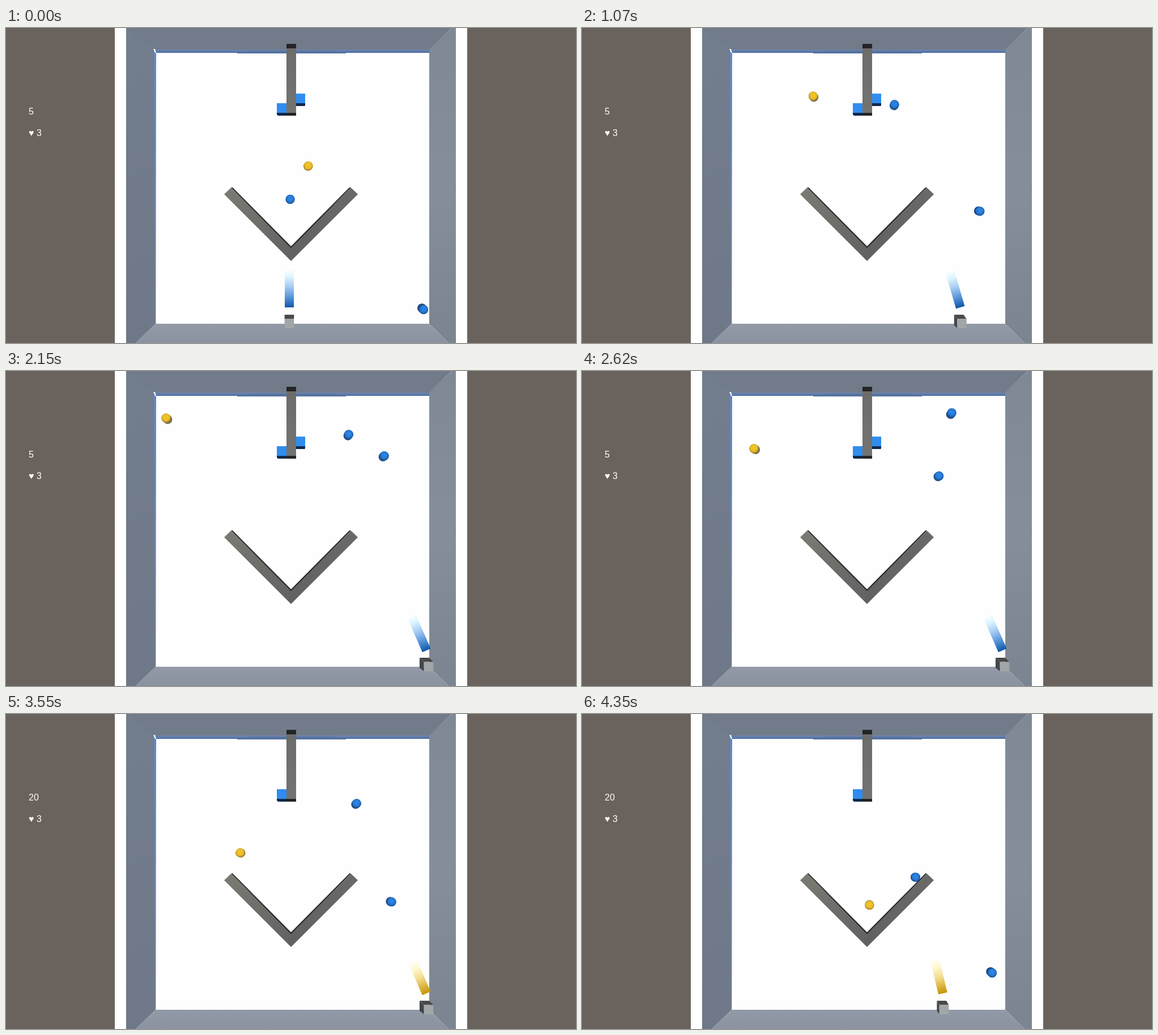
An HTML page that plays this animation: 1006x557 px, repeating every 4.41 s.

```html
<!DOCTYPE html>
<html lang="en">
<head>
<meta charset="utf-8">
<title>Bouncing balls</title>
<style>
  html, body { margin: 0; width: 100%; height: 100%; overflow: hidden; background: #6a625c; }
  svg { display: block; width: 100%; height: 100%; }
  text { font: 16px "Liberation Sans", Arial, sans-serif; fill: #fff; }
</style>
</head>
<body>
<svg viewBox="0 0 1006 557">
  <defs>
    <linearGradient id="wallLeft" x2="0" y2="1"><stop stop-color="#727d8d"/><stop offset="1" stop-color="#6f7888"/></linearGradient>
    <linearGradient id="wallRight" x2="0" y2="1"><stop stop-color="#7f8995"/><stop offset=".5" stop-color="#858f9b"/><stop offset="1" stop-color="#7b8491"/></linearGradient>
    <linearGradient id="wallBottom" x2="0" y2="1"><stop stop-color="#929aa7"/><stop offset="1" stop-color="#8a929f"/></linearGradient>
    <linearGradient id="ledge" x2="0" y2="1"><stop stop-color="#7288ab"/><stop offset="1" stop-color="#4a6da6"/></linearGradient>
    <linearGradient id="post" x2="0" y2="1"><stop stop-color="#6c6c6a"/><stop offset="1" stop-color="#737371"/></linearGradient>
    <linearGradient id="armLeft" x2="1" y2="1"><stop stop-color="#7a7c74"/><stop offset="1" stop-color="#616161"/></linearGradient>
    <linearGradient id="armRight" x1="1" x2="0" y2="1"><stop stop-color="#6a6a69"/><stop offset="1" stop-color="#616161"/></linearGradient>
    <linearGradient id="beamBlue" x2="0" y2="1">
      <stop stop-color="#fff"/><stop offset=".2" stop-color="#ddf6fe"/><stop offset=".45" stop-color="#a9cdf3"/>
      <stop offset=".75" stop-color="#5391d6"/><stop offset="1" stop-color="#0e57a8"/>
    </linearGradient>
    <linearGradient id="beamGold" x2="0" y2="1">
      <stop offset=".07" stop-color="#fff"/><stop offset=".3" stop-color="#fff8d0"/><stop offset=".55" stop-color="#f3e095"/>
      <stop offset=".8" stop-color="#deb540"/><stop offset="1" stop-color="#c4950a"/>
    </linearGradient>
    <radialGradient id="blue" cy=".42"><stop stop-color="#2f89ea"/><stop offset=".7" stop-color="#2679d6"/><stop offset="1" stop-color="#1d5ca8"/></radialGradient>
    <radialGradient id="gold" cy=".42"><stop stop-color="#f2c62a"/><stop offset=".75" stop-color="#eabc26"/><stop offset="1" stop-color="#bd9222"/></radialGradient>
    <radialGradient id="cyan" cy=".42"><stop stop-color="#2ad6ff"/><stop offset=".75" stop-color="#24d0fb"/><stop offset="1" stop-color="#25b4e0"/></radialGradient>
  </defs>

  <path fill="#fff" d="M192 0H814V557H192Z"/>
  <path fill="url(#wallLeft)" d="M212 0H264V523L229 557H212Z"/>
  <path fill="#727b8a" d="M212 0H786L747 39H262Z"/>
  <path fill="url(#wallRight)" d="M786 0H794V557H781L747 523V38Z"/>
  <path fill="url(#wallBottom)" d="M264 523H747L781 557H229Z"/>
  <path fill="#fefefe" d="M264 44H747V523H264Z"/>
  <path fill="url(#ledge)" d="M262 38H747V44H265Z"/>
  <path fill="#56739f" d="M408 44L440 40H575L600 44V45H408Z"/>
  <path fill="#6288bf" d="M261 40L265 44L264.4 523H263.5Z"/>
  <path fill="#f4f8ff" d="M260 37H263L265 44H263Z"/>

  <g id="target"><path fill="#2f8df0" d="M511 116H528V134H511Z"/><path fill="#11294a" d="M511 133H528V137L527 138H511Z"/></g>
  <path fill="#2f8df0" d="M478 133H496V150H478Z"/><path fill="#11294a" d="M478 150H496V155H480L478 153Z"/>
  <path fill="#242424" d="M495 28H512V155H495Z"/>
  <path fill="url(#post)" d="M495 36H512V150H495Z"/>
  <path fill="url(#armLeft)" d="M385 294L397 282.5L503 388V412Z"/>
  <path fill="url(#armRight)" d="M621 294L609 282.5L503 388V412Z"/>
  <path fill="#232423" d="M397 282H400L503 386L606 282H609L503 389Z"/>

  <rect id="beam" x="-8" y="-68" width="16" height="68"/>
  <path id="side" fill="#41474a"/><path id="back" fill="#484949"/><path id="front" fill="#a1a6a9"/>
  <g id="balls"></g>
  <text id="score" x="40" y="153">5</text>
  <text x="40" y="191">♥ 3</text>
</svg>
<script>
const LOOP = 4410, STEP = LOOP / 66, SHOT = 2672, HIT = 3330;
const CENTER = { x: 503, y: 278 };
const CEILING = 40, LEFT_WALL = 265.5, RADIUS = 8;
const LAUNCHER = { start: 500, limit: 746, end: 639, speed: 0.1645 };
const el = id => document.getElementById(id);

// Speeds in px per ms; vx turns into vxAfter when the ball leaves the ceiling
const balls = [
  { fill: 'gold', shade: '#77714f', x: 533.5, y: 244, vx: -0.1174, vxAfter: -0.1174, vy: 0.1156 },
  { fill: 'blue', shade: '#1f4b80', x: 501.5, y: 303, vx: 0.0468, vxAfter: 0.054, vy: 0.1568 },
  { fill: 'blue', shade: '#1f4b80', x: 737, y: 498, vx: -0.0324, vxAfter: -0.0372, vy: 0.1627 },
  { fill: 'cyan', shade: '#4f9cba', x: 722.5, y: 472, vx: -0.345, vxAfter: -0.345, vy: 0.835, from: SHOT, to: HIT }
];

const bounce = (v, wall) => wall + Math.abs(v - wall);

function ballAt({ x, y, vx, vxAfter, vy, from = 0 }, t) {
  const age = t - from;
  const hit = Math.min(age, (y - CEILING) / vy);
  return {
    x: bounce(x + vx * hit + vxAfter * (age - hit), LEFT_WALL),
    y: bounce(y - vy * age, CEILING)
  };
}

function launcherAt(t) {
  const { start, limit, end, speed } = LAUNCHER;
  const out = start + speed * Math.max(0, t - 33);
  const back = end + speed * (LOOP - STEP - t);
  return Math.min(out, limit, back);
}

function addShape(tag, attrs) {
  const node = document.createElementNS('http://www.w3.org/2000/svg', tag);
  setAll(node, attrs);
  el('balls').append(node);
  return node;
}

function setAll(node, attrs) {
  for (const name in attrs) node.setAttribute(name, attrs[name]);
}

for (const b of balls) {
  b.body = addShape('line', { stroke: b.shade, 'stroke-width': RADIUS * 2, 'stroke-linecap': 'round' });
  b.face = addShape('circle', { r: RADIUS, fill: `url(#${b.fill})` });
}

function drawBall(b, t) {
  const shown = t >= (b.from ?? 0) && t < (b.to ?? LOOP);
  b.body.style.display = b.face.style.display = shown ? '' : 'none';
  const { x, y } = ballAt(b, t);
  setAll(b.face, { cx: x, cy: y });
  // the far end of each ball leans towards the vanishing point
  setAll(b.body, { x1: x, y1: y, x2: x - (x - CENTER.x) * 0.013, y2: y - (y - CENTER.y) * 0.013 });
}

function drawLauncher(t) {
  const x = launcherAt(t);
  const depth = (x - CENTER.x) * 0.032;
  const l = x - 8.3, r = x + 8.3, farL = l - depth, farR = r - depth;
  setAll(el('front'), { d: `M${l} 514.5H${r}V531H${l}Z` });
  setAll(el('back'), { d: `M${farL} 507H${farR}L${r} 514.5H${l}Z` });
  setAll(el('side'), { d: `M${farL} 507L${l} 514.5V531L${farL} 525Z` });
  const mid = x - depth / 2;
  setAll(el('beam'), {
    transform: `translate(${mid} 494) rotate(${-0.097 * (mid - LAUNCHER.start)})`,
    fill: t < SHOT ? 'url(#beamBlue)' : 'url(#beamGold)'
  });
}

function draw(now) {
  const t = Math.floor(((now % LOOP) + 7) / STEP) % 66 * STEP;
  drawLauncher(t);
  for (const b of balls) drawBall(b, t);
  el('target').style.display = t < HIT ? '' : 'none';
  el('score').textContent = t < HIT ? '5' : '20';
}

let start;
function tick(now) {
  start ??= now;
  draw(now - start);
  requestAnimationFrame(tick);
}
draw(0);
requestAnimationFrame(tick);
</script>
</body>
</html>
```
